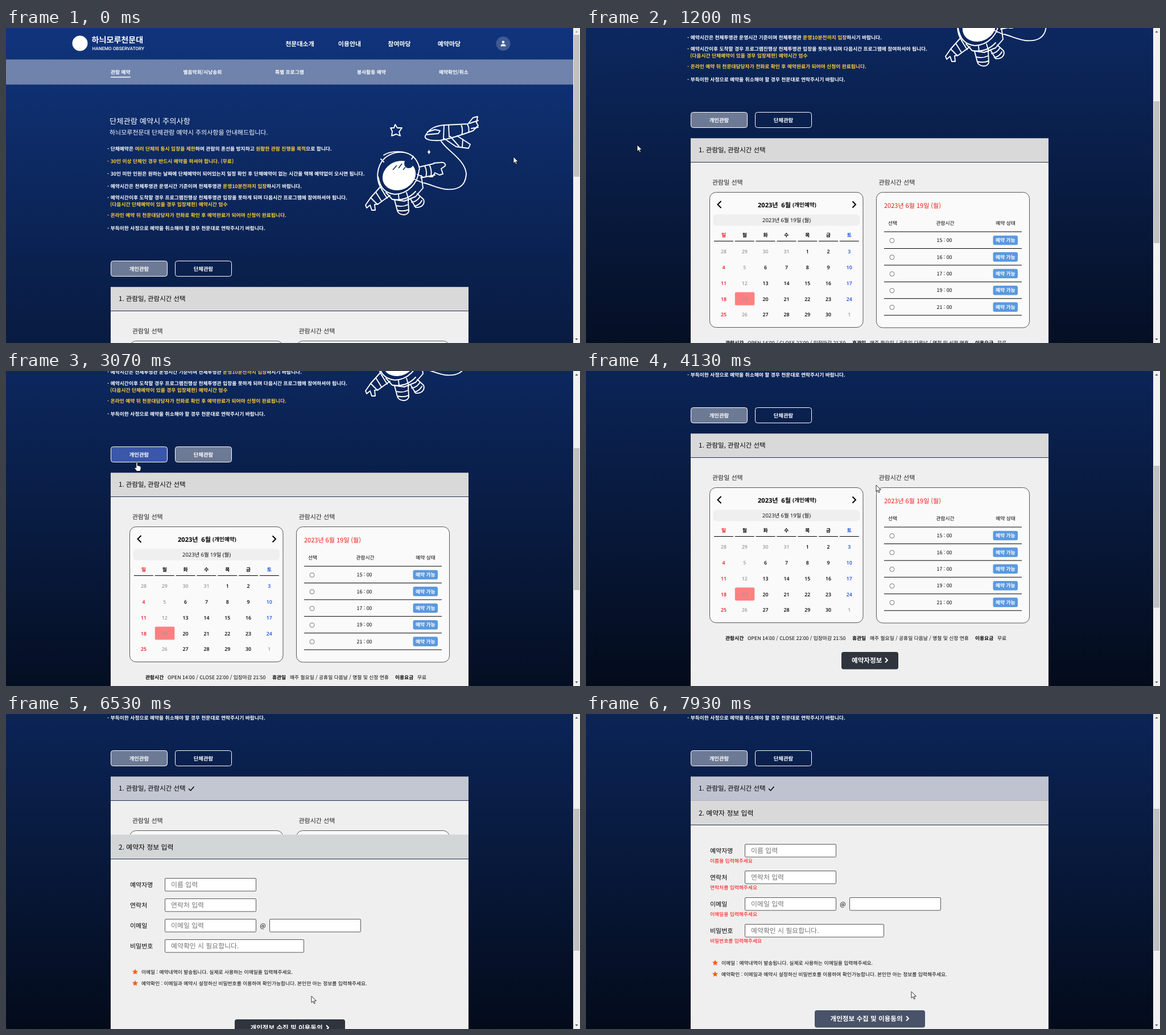
Animation of 1009x555 px, one loop 8 s. Source, as an HTML page:

```html
<!DOCTYPE html>
<html lang="ko">
<head>
<meta charset="utf-8">
<title>관람 예약</title>
<style>
html, body { margin: 0; width: 100%; height: 100%; overflow: hidden; background: #10347c; }
svg { display: block; width: 1009px; height: 555px; }
text { font-family: "Noto Sans CJK KR", "Noto Sans CJK JP", sans-serif; text-rendering: geometricPrecision; }
.o { font-family: "Open Sans", "Noto Sans CJK KR", sans-serif; }
.m { font-weight: 500; }
.b { font-weight: 700; }
.line { fill: none; stroke: #fff; stroke-width: 1.9; stroke-linecap: round; stroke-linejoin: round; }
</style>
</head>
<body>
<svg id="stage" viewBox="0 0 1009 555"></svg>
<script>
const BASE = 8.76, MID = 11, HEAD = 11.6, LOOP = 8000, REST = 346;
const $ = id => document.getElementById(id);

// Text placed by its left (or middle) x and its vertical centre
const txt = (x, y, s, size = BASE, attr = '') =>
  `<text x="${x}" y="${y + .37 * size}" font-size="${size}" ${attr}>${s}</text>`;
const mid = (x, y, s, size, attr = '') => txt(x, y, s, size, 'text-anchor="middle" ' + attr);
const box = (x, y, w, h, r, attr) => `<rect x="${x}" y="${y}" width="${w}" height="${h}" rx="${r}" ${attr}/>`;
const path = (d, attr) => `<path d="${d}" ${attr}/>`;
const yellow = s => `<tspan fill="#ffcd38">${s}</tspan>`;
const M = 'class="m"', B = 'class="b"';
const arrow = (x, y, dir, h, color, w) =>
  path(`M${x} ${y - h}l${dir * h} ${h}l${-dir * h} ${h}`, `fill="none" stroke="${color}" stroke-width="${w}"`);

function header() {
  const menu = [[516.5, '천문대소개'], [604, '이용안내'], [691.5, '참여마당'], [779, '예약마당']];
  const sub = [[184, '관람 예약'], [311.5, '별음악회/시낭송회'], [473, '특별 프로그램'], [617, '봉사활동 예약'], [761, '예약확인/취소']];
  return '<circle cx="130" cy="27" r="13.5"/>' +
    txt(150.5, 21, '하늬모루천문대', 14.1, B) +
    txt(151.5, 36, 'HANEMO OBSERVATORY', 8.1, 'class="m" style="font-family:Roboto,sans-serif"') +
    menu.map(([x, s]) => mid(x, 28, s, MID, B)).join('') +
    '<circle cx="874" cy="27.5" r="12.5" fill-opacity=".2"/><circle cx="874" cy="24.8" r="2.3"/>' +
    path('M869.5 32.2q0-4 4.500-4t4.500 4z', '') +
    box(0, 55.4, 997, 44.3, 0, 'fill-opacity=".4"') +
    sub.map(([x, s]) => txt(x, 77.5, s, BASE, B)).join('') +
    box(184, 85.8, 35, 1.5, 0, '');
}

function notice() {
  const rows = [
    [212.5, `- 단체예약은 ${yellow('여러 단체의 동시 입장을 제한')}하여 관람의 혼선을 방지하고 ${yellow('원활한 관람 진행을 목적')}으로 합니다.`],
    [235, yellow('- 30인 이상 단체인 경우 반드시 예약을 하셔야 합니다. (무료)')],
    [257, '- 30인 미만 인원은 원하는 날짜에 단체예약이 되어있는지 일정 확인 후 단체예약이 없는 시간을 택해 예약없이 오시면 됩니다.'],
    [279, `- 예약시간은 천체투영관 운영시간 기준이며 천체투영관 ${yellow('운영10분전까지 입장')}하시기 바랍니다.`],
    [298.5, '- 예약시간이후 도착할 경우 프로그램진행상 천체투영관 입장을 못하게 되며 다음시간 프로그램에 참여하셔야 됩니다.'],
    [310.5, yellow('(다음시간 단체예약이 있을 경우 입장제한) 예약시간 엄수'), 183],
    [330, yellow('- 온라인 예약 뒤 천문대담당자가 전화로 확인 후 예약완료가 되어야 신청이 완료됩니다.')],
    [352.5, '- 부득이한 사정으로 예약을 취소해야 할 경우 천문대로 연락주시기 바랍니다.']
  ];
  return txt(182, 164, '단체관람 예약시 주의사항', 13.3, M) +
    txt(182, 183.5, '하늬모루천문대 단체관람 예약시 주의사항을 안내해드립니다.', MID, M) +
    rows.map(([y, s, x = 178]) => txt(x, y, s, BASE, B)).join('');
}

function astronaut() {
  const lines = [
    'M684 170l4 6 8 0-5 7 2 7-7-3-8 3 1-8-3-6 6 0z',
    // plane
    'M737 190c7-13 18-18 34-19l41-2 9-11 8-2-2 11 3 5-9 9c-19 7-38 14-58 17-19 1-28-2-26-8z',
    'M741 183l13-4 9 2-3 5-22 2M770 171l-1 24M778 171l1 21M800 170q4 9 1 18M811 169q4 8 2 15M815 168l15-5M818 177l12-2',
    'M769 194l22 15 22 3 3-7-23-15M781 191l15 17M803 196l-1 14',
    // rope
    'M764 198c10 18 43 33 45 59-1 24-18 29-37 27-14-2-25-8-37-11',
    // helmet
    'M661 285c-12-17-10-42 5-56 22-18 56-13 61 20M654 262c4 20 12 29 30 31 22-1 40-18 42-43',
    'M664 224c12-8 38-9 51 2M659 231l5 5M716 226l-3 5',
    // right arm
    'M726 245l26-6M729 264l25-5M736 243q5 9 2 19M744 241q5 9 3 20',
    'M752 238l12-1c6-1 9 2 8 6l-7 5 3 9-6 2-8-4-4 7-6 0',
    // left arm
    'M657 281l-16 18 12 12 22-16M650 289l10 16M660 284l10 16M641 299l-9 13 2 5 6-5 3 9 6 0-1-10 5-1',
    // body and legs
    'M668 290l11 12 21 3 20-8 13-15-3-22M681 302c14 2 28-2 39-14M717 266l16 7M723 258l9 4M690 294l1 10M704 290l4 13',
    'M683 303l5 19c2 8 17 10 20 1l-1-20M686 313q11 3 21-2M688 321q10 3 20-1',
    'M711 301l9 15c11 1 17-6 14-14l-11-10M713 307q9-1 14-9M718 314q9-2 13-10'
  ];
  return path(lines.join(''), 'class="line"') +
    '<ellipse cx="691" cy="260" rx="30" ry="25" transform="rotate(-25 691 260)"/>' +
    '<circle cx="708" cy="239" r="8" fill="#0c2c69"/>' +
    path('M680 250l7-8M690 247l6-8M698 250l4-5', 'stroke="#0c2c69" stroke-width="1.5"') +
    path('M743.500 214l1.200 3.300 2 1.200-2 1.200-1.200 3.300-1.200-3.300-2-1.200 2-1.200z', '');
}

function calendar() {
  let out = box(217.5, 205.5, 269.5, 238, 11, 'fill="#fafafa" stroke="#555"') +
    arrow(237.5, 227, -1, 6, '#000', 2) + arrow(468.5, 227, 1, 5.5, '#000', 2) +
    txt(302, 227.5, '2023년&#160;&#160;6월', 11.1, 'class="o b"') +
    txt(363, 227.5, '(개인예약)', 9.6, 'class="o b" id="kind"') +
    box(223.5, 244.5, 257.5, 20, 6, 'fill="#efefef"') +
    mid(352.5, 255, '2023년 6월 19일 (월)', 9.4, 'class="o"');
  const red = '#e8121b', blue = '#164be0';
  [...'일월화수목금토'].forEach((d, i) => {
    const x = 242 + i * 36.8, weekend = i === 0 ? red : i === 6 ? blue : '#000';
    out += mid(x, 281, d, BASE, `class="b" fill="${weekend}"`) + box(x - 17, 291, 34, 1, 0, '');
    for (let r = 0; r < 5; r++) {
      const n = r * 7 + i - 3, y = 310 + r * 27.8;
      const day = n < 1 ? n + 31 : n > 30 ? n - 30 : n;
      const closed = n < 1 || n > 30 || i === 1;
      if (n === 19) out += box(x - 17, y - 12, 34.5, 23, 2, 'fill="#ff8080"');
      out += mid(x, y, day, BASE, `class="o" font-weight="600" fill="${closed ? '#9a9a9a' : weekend}"`);
    }
  });
  return out;
}

function times() {
  let out = box(510.5, 205.5, 269, 238.5, 11, 'fill="#fafafa" stroke="#555"') +
    txt(524, 228.5, '2023년 6월 19일 (월)', MID, 'fill="#ee1c12"') +
    txt(531, 260, '선택', BASE, M) + mid(631.5, 260, '관람시간', BASE, M) + mid(737.5, 260, '예약 상태', BASE, M) +
    box(524, 274.5, 242, 1, 0, '');
  [15, 16, 17, 19, 21].forEach((h, i) => {
    const y = 290 + i * 29.4;
    out += `<circle cx="538" cy="${y + .5}" r="4" fill="#fff" stroke="#767676"/>` +
      mid(630, y, h + ' : 00', BASE, M) +
      box(715.5, y - 8.3, 43.5, 16.6, 3, 'fill="#5b99de"') +
      mid(737.3, y, '예약 가능', BASE, 'class="b" fill="#fff"') +
      box(524, y + 14, 242, 1, 0, '');
  });
  return out + '<g id="picked"><circle cx="538" cy="290.5" r="4" fill="#fff" stroke="#0075ff"/><circle cx="538" cy="290.5" r="2.4" fill="#0075ff"/></g>';
}

const button = (id, x, y, w, s, tx, ax) =>
  `<g id="${id}">${box(x, y, w, 30.5, 4, '')}${txt(tx, y + 15, s, HEAD, 'class="b" fill="#fff"')}${arrow(ax, y + 14.5, 1, 4, '#fff', 2)}</g>`;

function sectionOne() {
  const info = [[245, '관람시간', B], [284, 'OPEN 14:00 / CLOSE 22:00 / 입장마감 21:50', M], [468, '휴관일', B],
    [499, '매주 월요일 / 공휴일 다음날 / 명절 및 신정 연휴', M], [684, '이용요금', B], [723, '무료', M]];
  return box(184, 110.5, 629, 800, 0, 'fill="#efefef"') +
    box(184, 110.5, 629, 42, 0, 'id="head1"') + box(184, 152, 629, 1, 0, 'fill="#26304f"') +
    txt(198, 131, '1. 관람일, 관람시간 선택', 11.5, M) +
    path('M321 131.500l3.500 3.500 6-7', 'id="check" fill="none" stroke="#000" stroke-width="1.5"') +
    txt(222, 187.5, '관람일 선택', MID, 'fill="#222"') + txt(514.5, 187.5, '관람시간 선택', MID, 'fill="#222"') +
    calendar() + times() +
    info.map(([x, s, a]) => txt(x, 471, s, BASE, a)).join('') +
    button('next', 449, 495, 100, '예약자정보', 467, 526);
}

const star = (x, y) => path(Array.from({ length: 10 }, (_, i) => {
  const r = i % 2 ? 2.5 : 5.4, a = i * Math.PI / 5;
  return (i ? 'L' : 'M') + (x + r * Math.sin(a)).toFixed(2) + ' ' + (y - r * Math.cos(a)).toFixed(2);
}).join('') + 'z', 'fill="#ff5a14"');

function sectionTwo() {
  const fields = [['예약자명', '이름 입력', '이름을'], ['연락처', '연락처 입력', '연락처를'],
    ['이메일', '이메일 입력', '이메일을'], ['비밀번호', '예약확인 시 필요합니다.', '비밀번호를']];
  const input = (x, w) => box(x, 229.5, w, 22.5, 1.5, 'fill="#fff" stroke="#555"');
  return box(184, 152.5, 629, 800, 0, 'fill="#efefef"') +
    box(184, 152.5, 629, 43, 0, 'id="head2"') + box(184, 195, 629, 1, 0, 'fill="#26304f"') +
    txt(198, 174.5, '2. 예약자 정보 입력', 11.9, M) +
    fields.map(([label, hint, what], i) => `<g class="field">` +
      txt(218, 240.5, label, MID, M) + input(279.5, i === 3 ? 244 : 160) +
      txt(290, 240.5, hint, 11.9, 'fill="#757575" font-weight="300"') +
      (i === 2 ? mid(451.5, 240.5, '@', MID) + input(463.5, 160) : '') +
      txt(218, 258.5, what + ' 입력해주세요', BASE, 'class="error" fill="#f00"') + '</g>').join('') +
    '<g id="foot">' + star(227, 394.5) + star(227, 414.5) +
    txt(238, 394.5, '이메일 : 예약내역이 발송됩니다. 실제로 사용하는 이메일을 입력해주세요.', BASE, M) +
    txt(238, 414.5, '예약확인 : 이메일과 예약시 설정하신 비밀번호를 이용하여 확인가능합니다. 본인만 아는 정보를 입력해주세요.', BASE, M) +
    button('agree', 402, 478, 194, '개인정보 수집 및 이용동의', 429.5, 563) + '</g>';
}

const tab = (id, x, s) => box(x + .5, 410.5, 99, 27, 4, `id="${id}" stroke="#fff"`) + mid(x + 50, 424.5, s, 9.4, B);

$('stage').innerHTML =
  `<linearGradient id="sky" x2="0" y2="1"><stop stop-color="#10347c"/><stop offset="1"/></linearGradient>
  <g id="page">${box(0, 0, 997, 1150, 0, 'fill="url(#sky)"')}
  <g fill="#fff">${header()}${notice()}${astronaut()}${tab('tab1', 184, '개인관람')}${tab('tab2', 297, '단체관람')}</g>
  <g transform="translate(0 ${REST})">${sectionOne()}<g id="two">${sectionTwo()}</g></g></g>
  ${box(997, 0, 12, 555, 0, 'fill="#f1f1f1"')}${box(998, 12, 10, 250, 0, 'id="thumb" fill="#c1c1c1"')}
  ${path('M1000.500 8l2.500-3 2.500 3z', 'id="up"')}${path('M1000.500 547l2.500 3 2.500-3z', 'fill="#505050"')}
  <g id="cursor" fill="#fff" stroke="#000" stroke-width=".8">
  ${path('M0 0v11.500l2.700-2.500 1.800 4.300 1.900-.8-1.800-4.200h3.700z', 'id="pointer"')}
  ${path('M-1.200 1q1.200-2 2.400 0v5q1.300-1 2.200.3 1.300-.6 2 .5 1.600-.2 1.700 1.200v3.500l-1.300 4h-6l-3.700-5q-.4-1.700 1.200-1.500l1.500 1z', 'id="hand"')}</g>`;

const clamp = v => Math.max(0, Math.min(1, v));
const smooth = u => u * u * (3 - 2 * u);
const ramp = (t, start, len = 300) => smooth(clamp((t - start) / len));
const mix = (a, b, p) => a.map((v, i) => v + (b[i] - v) * p);
const blend = (t, first, ...changes) => {
  const c = changes.reduce((c, [at, to]) => mix(c, to, ramp(t, at)), first);
  return `rgba(${c.map(v => +v.toFixed(3)).join()})`;
};
const show = (el, on) => el.setAttribute('visibility', on ? 'visible' : 'hidden');
// Moves snap to whole pixels, as scrolling does
const shift = (el, x, y) => el.setAttribute('transform', `translate(${Math.round(x)} ${Math.round(y)})`);
const fill = (id, c) => $(id).setAttribute('fill', c);

const CLEAR = [255, 255, 255, 0], ACTIVE = [255, 255, 255, .4], HOVER = [58, 87, 171, 1];
const DARK = [47, 52, 61, 1], LIT = [72, 82, 105, 1], GREY = [217, 217, 217, 1], DONE = [191, 195, 208, 1];
const WHEEL = [400, 618, 840, 1061, 3900];
const TRACK = [[60, 892, 227], [560, 77, 232], [700, 77, 232], [1200, 90, 206], [1950, 345, 152], [2180, 345, 152],
  [2580, 230, 161], [3100, 230, 161], [3860, 507, 201], [4130, 510, 201], [4730, 538, 290], [5540, 538, 290],
  [6100, 537, 497], [6700, 537, 497], [6900, 585, 515], [7220, 572, 489]];
const HANDS = [[1800, 2230], [2420, 3250], [5950, 6380], [7230, 7920]];
const fields = [...document.querySelectorAll('.field')], errors = document.querySelectorAll('.error');

function cursorAt(t) {
  const i = TRACK.findIndex(k => k[0] > t);
  if (i < 0) return TRACK[TRACK.length - 1];
  if (i === 0) return TRACK[0];
  const a = TRACK[i - 1], b = TRACK[i];
  return mix(a, b, ramp(t, a[0], b[0] - a[0]));
}

function draw(t) {
  const scroll = WHEEL.reduce((s, at) => s + REST / 5 * ramp(t, at, 200), 0);
  shift($('page'), 0, -scroll);
  $('thumb').setAttribute('y', Math.round(12 + scroll * .448));
  fill('up', scroll > 0 ? '#505050' : '#a3a3a3');

  fill('tab1', blend(t, ACTIVE, [2100, CLEAR], [2400, HOVER], [3075, ACTIVE]));
  fill('tab2', blend(t, CLEAR, [1830, HOVER], [2100, ACTIVE], [3075, CLEAR]));
  $('kind').textContent = t > 2090 && t < 3060 ? '(단체예약)' : '(개인예약)';
  show($('picked'), t > 5525);
  fill('next', blend(t, DARK, [6000, LIT]));

  show($('check'), t > 6320);
  fill('head1', blend(t, GREY, [6310, DONE]));
  fill('head2', blend(t, [195, 207, 207, 1], [6330, GREY]));
  const slide = .5 - .5 * Math.cos(Math.PI * clamp((t - 6306.6) / 300));
  shift($('two'), 0, 405 * (1 - slide));

  const failed = t > 7790;
  fields.forEach((f, i) => shift(f, 0, i * (failed ? 47.1 : 36)));
  errors.forEach(e => show(e, failed));
  shift($('foot'), 0, failed ? 44.4 : 0);
  fill('agree', blend(t, DARK, [7230, LIT]));

  const [, x, y] = cursorAt(t), hand = HANDS.some(([a, b]) => t >= a && t < b);
  shift($('cursor'), x, y);
  show($('hand'), hand);
  show($('pointer'), !hand);
}

const begin = performance.now();
function tick() {
  draw((performance.now() - begin) % LOOP);
  requestAnimationFrame(tick);
}
tick();
</script>
</body>
</html>
```
